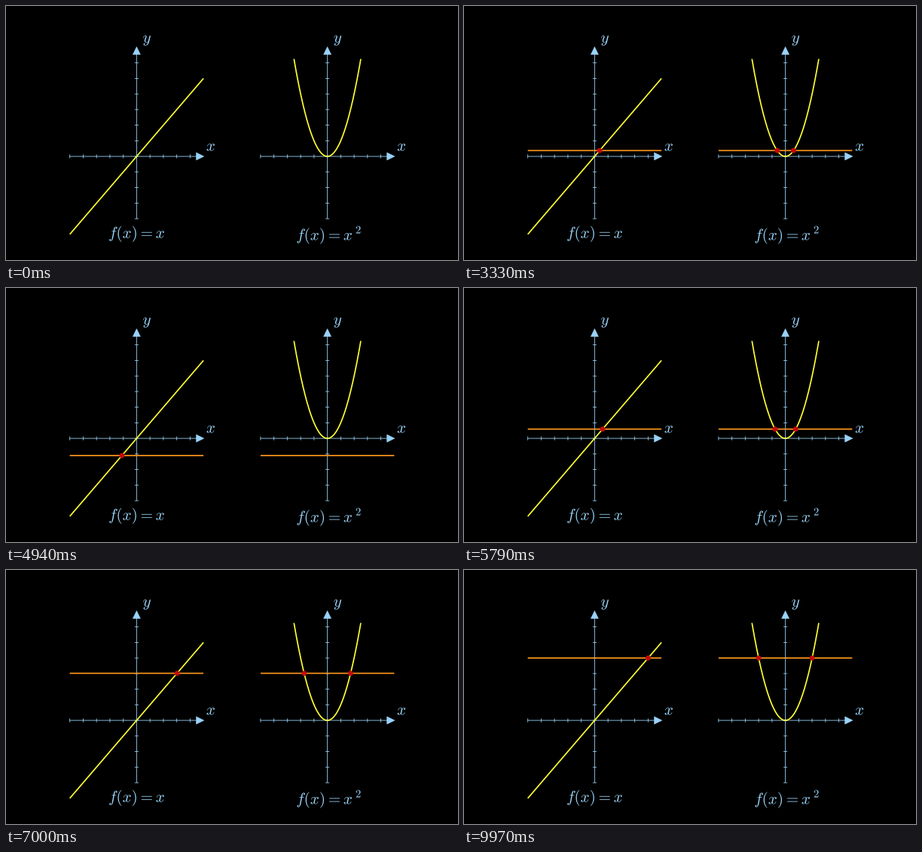
Write a matplotlib script that moves like this. It is 600 px wide and 338 px high and loops after 10000 ms.

```python
import numpy as np
import matplotlib.pyplot as plt
from matplotlib.animation import FuncAnimation
from matplotlib.patches import Circle, PathPatch, Polygon
from matplotlib.textpath import TextPath
from matplotlib.transforms import Affine2D

W, H, DPI = 600, 338, 100
FRAMES, LOOP_MS = 330, 10000
UNIT = H / 8                                # pixels per scene unit
UX, UY = 4.2 * UNIT / 10, 5.4 * UNIT / 11   # pixels per axis step
ORIGIN_Y = 200.1
EM = UNIT / 2
THIN, THICK = 0.02 * UNIT, 0.04 * UNIT
BLUE, YELLOW, ORANGE, RED = "#9ad3f8", "#ffff33", "#ff981c", "#c40a0a"

plt.rcParams["mathtext.fontset"] = "cm"
fig = plt.figure(figsize=(W / DPI, H / DPI), dpi=DPI, facecolor="black")
ax = fig.add_axes([0, 0, 1, 1])
ax.set_xlim(0, W)
ax.set_ylim(H, 0)
ax.axis("off")


def stroke(xs, ys, color, width, z):
    line, = ax.plot(xs, ys, color=color, lw=width * 72 / DPI, zorder=z,
                    solid_capstyle="butt", snap=False)
    return line


def label(tex, cx, cy, size=EM):
    """Typeset tex with the middle of its ink at (cx, cy)."""
    path = TextPath((0, 0), f"${tex}$", size=size)
    box = path.get_extents()
    move = (Affine2D()
            .translate(-(box.x0 + box.x1) / 2, -(box.y0 + box.y1) / 2)
            .scale(1, -1).translate(cx, cy))
    ax.add_patch(PathPatch(move.transform_path(path), fc=BLUE, lw=0, zorder=5))


def arrow_tip(x, y, dx, dy, length=10.2, half=5):
    base = np.array([x - dx * length, y - dy * length])
    side = half * np.array([dy, dx])
    ax.add_patch(Polygon([(x, y), base + side, base - side],
                         fc=BLUE, ec=BLUE, lw=0.4, zorder=2))


class Plot:
    def __init__(self, ox, func, reach, roots):
        self.ox, self.roots = ox, roots
        self.draw_axes()
        x = np.linspace(-reach, reach, 201)
        stroke(*self.to_px(x, func(x)), YELLOW, THICK, 3)
        self.level = stroke([], [], ORANGE, THICK, 4)
        self.dots = [ax.add_patch(Circle((0, 0), 0.08 * UNIT, fc=RED, lw=0, zorder=6))
                     for _ in roots(1)]

    def to_px(self, x, y):
        return self.ox + x * UX, ORIGIN_Y - y * UY

    def draw_axes(self, tick=2.5):
        left, bottom = self.to_px(-5, -4)
        right, top = self.to_px(5, 7)
        stroke([left, right - 5], [ORIGIN_Y] * 2, BLUE, THIN, 1)
        stroke([self.ox] * 2, [bottom, top + 5], BLUE, THIN, 1)
        for i in range(-5, 5):
            x, y = self.to_px(i, 0)
            stroke([x, x], [y - tick, y + tick], BLUE, THIN, 1)
        for i in range(-4, 7):
            x, y = self.to_px(0, i)
            stroke([x - tick, x + tick], [y, y], BLUE, THIN, 1)
        arrow_tip(right + 0.6, ORIGIN_Y, 1, 0)
        arrow_tip(self.ox, top - 0.6, 0, -1)
        label("x", right + 9.6, 188)
        label("y", self.ox + 13.6, 46)

    def update(self, height, grown, show_dots):
        x0, y = self.to_px(-5, height)
        self.level.set_data([x0, x0 + 10 * UX * grown], [y, y])
        self.level.set_visible(grown > 0)
        roots = self.roots(height)
        for i, dot in enumerate(self.dots):
            dot.set_visible(show_dots and i < len(roots))
            if i < len(roots):
                dot.center = self.to_px(roots[i], height)


def square_roots(y):
    return [-y ** 0.5, y ** 0.5] if y >= 0 else []


def smooth(t):
    t = np.clip(t, 0, 1)
    sigmoid = lambda v: 1 / (1 + np.exp(-v))
    edge = sigmoid(-5)
    return np.clip((sigmoid(10 * (t - 0.5)) - edge) / (1 - 2 * edge), 0, 1)


plots = [Plot(173.4, lambda x: x, 5, lambda y: [y]),
         Plot(426.6, lambda x: x ** 2, 2.5, square_roots)]
label("f(x) = x", 173.5, 303.3)
label("f(x) = x", 422.7, 306)
label("2", 467.6, 297.6, 0.7 * EM)


def update(frame):
    t = frame * LOOP_MS / FRAMES / 1000 + 0.01
    height = np.interp(t, [3, 4.5, 7.5], [1, -2, 4])
    for plot in plots:
        plot.update(height, smooth(t - 1), t >= 2)
    return []


anim = FuncAnimation(fig, update, frames=FRAMES, interval=LOOP_MS / FRAMES,
                     init_func=lambda: update(0), repeat=True, repeat_delay=0)
plt.show()
```
